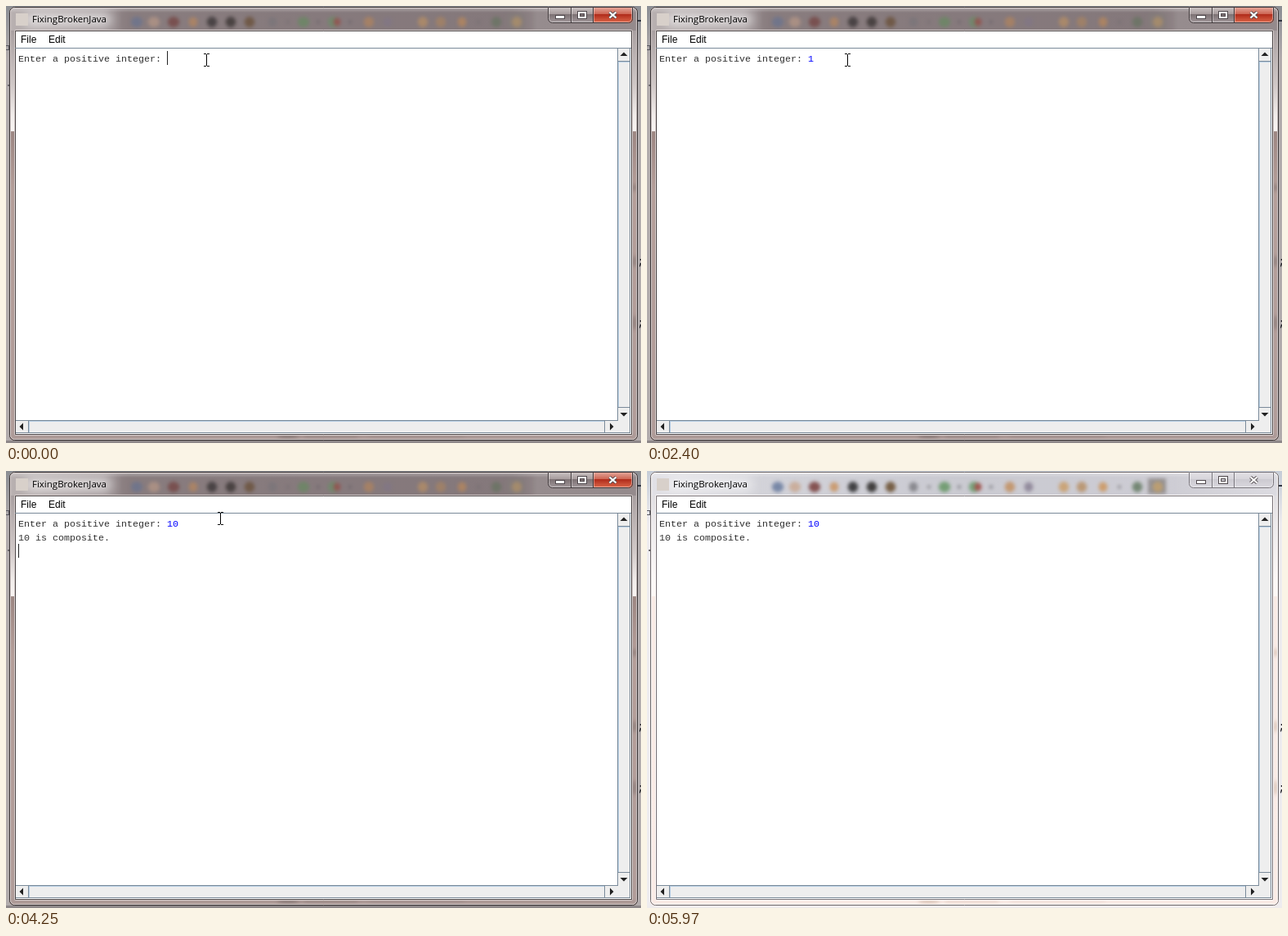
Recreate the animation shown at these times as an HTML page with a canvas. Size 777 px wide and 534 px high, loop 6.03 s.

```html
<!DOCTYPE html>
<html lang="en">
<head>
<meta charset="utf-8">
<title>FixingBrokenJava</title>
<style>
html, body { margin: 0; width: 100%; height: 100%; overflow: hidden; background: #b5b0b1; }
canvas { display: block; width: 777px; height: 534px; }
</style>
</head>
<body>
<canvas id="stage" width="777" height="534"></canvas>
<script>
const W = 777, H = 534, LOOP = 6030;
const ctx = document.getElementById('stage').getContext('2d');
const LINE = '#7a8a99', PANEL = '#eeeeee';

// Blurred toolbar icons seen through the glass: [x, colour, radius]
const ICONS = [
  [160, '#5f7399', 8], [181, '#c8a48c', 8], [205, '#6e2e2a', 8], [229, '#c98d55', 6],
  [252, '#171717', 7], [275, '#171512', 7], [298, '#5e401c', 7], [326, '#76767a', 6],
  [345, '#66666a', 2], [364, '#5c9159', 8], [382, '#58585c', 2], [400, '#619661', 7],
  [405, '#a03b36', 5], [421, '#58585c', 2], [444, '#c18a55', 7], [467, '#81788c', 6],
  [510, '#c9995e', 7], [532, '#b58a5a', 7], [558, '#cc8f50', 6], [578, '#66666a', 2],
  [600, '#5b7358', 7], [625, '#bf9b61', 7]
];

const ACTIVE = {
  edge: ['#8b8e94', '#b2acad'], outline: '#383233', rim: '#d9d0cf',
  title: [[0, '#b9b1b1'], [0.15, '#9f9597'], [0.19, '#8b8082'], [0.8, '#857a7d'],
          [0.84, '#968c8e'], [1, '#948a8c']],
  side: [[0, '#91878a'], [0.06, '#a9a0a1'], [0.18, '#cfc7c6'], [0.25, '#f1ecea'], [0.286, '#f8f4f2'],
         [0.288, '#9b8581'], [0.42, '#b39d98'], [1, '#af9b98']],
  bottom: '#ad9a97', smudge: '#746866', iconAlpha: 0.8, tint: '#85777955', glow: 0.72,
  button: ['#c9c1c1', '#a59a9b', '#7d7274', '#a1979a'],
  close: ['#e3a497', '#cc6250', '#b02c1b', '#dc6548'], buttonLine: '#40383a'
};
const IDLE = {
  edge: ['#c5ccd7', '#eeecef'], outline: '#6c6668', rim: '#fdfaf9',
  title: [[0, '#e2e1e6'], [0.17, '#d3d3d9'], [0.5, '#c9c9d0'], [0.82, '#cdccd3'], [1, '#dcdbe1']],
  side: [[0, '#d6d5da'], [0.12, '#ece9eb'], [0.25, '#fcf8f7'], [0.286, '#fdf8f6'],
         [0.288, '#f8eae5'], [1, '#f9ebe6']],
  bottom: '#f9eae5', smudge: '#c4a998', iconAlpha: 0.85, tint: '#d0d0d818', glow: 0.6,
  button: ['#e2e0e5', '#d6d4da', '#cccad1', '#dad8de'],
  close: ['#e2e0e5', '#d6d4da', '#cccad1', '#dad8de'], buttonLine: '#77747b'
};

function rect(c, x, y, w, h, fill) {
  c.fillStyle = fill;
  c.fillRect(x, y, w, h);
}

function text(c, str, x, y, font, fill) {
  c.font = font;
  c.fillStyle = fill;
  c.fillText(str, x, y);
}

function gradient(c, x0, y0, x1, y1, stops) {
  const g = c.createLinearGradient(x0, y0, x1, y1);
  stops.forEach(([at, colour]) => g.addColorStop(at, colour));
  return g;
}

function blob(c, x, y, rx, ry, fill) {
  c.fillStyle = fill;
  c.beginPath();
  c.ellipse(x, y, rx, ry, 0, 0, Math.PI * 2);
  c.fill();
}

function outline(c, x, y, w, h, radius, colour) {
  c.strokeStyle = colour;
  c.lineWidth = 1;
  c.beginPath();
  c.roundRect(x + 0.5, y + 0.5, w - 1, h - 1, radius);
  c.stroke();
}

function drawSurround(c, s) {
  rect(c, 0, 0, W, H, gradient(c, 0, 0, 0, H, [[0, s.edge[0]], [0.12, s.edge[1]], [1, s.edge[1]]]));
  rect(c, 0, 531, W, 3, s === ACTIVE ? '#8d8789' : '#eeebec');
  rect(c, 0, 48, 4, 1, '#55555c');
  rect(c, 3, 48, 1, 6, '#55555c');
  rect(c, 0, 53, 4, 1, '#55555c');
  rect(c, 2, 96, 2, 2, '#6a686c');
  [316, 391].forEach(y => text(c, ';', 773, y, 'bold 12px "Liberation Mono", monospace', '#1c1c22'));
  rect(c, 773, 17, 4, 2, '#303540');
}

function drawGlass(c, s) {
  c.save();
  c.beginPath();
  c.roundRect(4, 1, 769, 530, 6);
  c.clip();
  rect(c, 4, 1, 769, 530, gradient(c, 0, 1, 0, 531, s.side));
  rect(c, 4, 1, 769, 29, gradient(c, 4, 0, 773, 0, s.title));
  rect(c, 4, 522, 769, 9, s.bottom);

  c.filter = 'blur(2px)';
  c.globalAlpha = s.iconAlpha;
  rect(c, 613, 9, 22, 19, '#85817e');
  ICONS.forEach(([x, colour, r]) => blob(c, x, 19.5, r * 0.9, Math.min(r, 6.5), colour));
  c.globalAlpha = 1;
  rect(c, 140, 6, 505, 25, s.tint);

  c.globalAlpha = 0.5;
  blob(c, 345, 526, 13, 3, s.smudge);
  rect(c, 365, 525, 65, 2, s.smudge);
  rect(c, 445, 525, 115, 1, s.smudge);
  blob(c, 769, 222, 3, 5, s.smudge);
  blob(c, 769, 312, 3, 7, s.smudge);
  blob(c, 769, 387, 3, 9, s.smudge);

  c.filter = 'blur(7px)';
  c.globalAlpha = s.glow;
  rect(c, 24, 9, 104, 15, '#ffffff');
  c.restore();

  rect(c, 6, 2, 765, 6, gradient(c, 0, 2, 0, 8, [[0, '#ffffff55'], [1, '#ffffff00']]));
  outline(c, 4, 1, 769, 530, 6, s.outline);
  outline(c, 5, 2, 767, 528, 5, s.rim);
  outline(c, 10, 29, 757, 496, 1, s.rim);
  outline(c, 11, 30, 755, 494, 0, s === ACTIVE ? '#4b4546' : '#777176');
}

function drawCaptionButtons(c, s) {
  const shade = ([a, b, d, e]) => gradient(c, 0, 2, 0, 20, [[0, a], [0.45, b], [0.47, d], [1, e]]);
  c.save();
  c.beginPath();
  c.roundRect(663, 1, 104, 20, [0, 0, 5, 5]);
  c.clip();
  rect(c, 663, 1, 56, 20, shade(s.button));
  rect(c, 719, 1, 48, 20, shade(s.close));
  c.restore();
  outline(c, 664, 1, 102, 19, [0, 0, 4, 4], '#ffffff70');
  outline(c, 663, 1, 104, 20, [0, 0, 5, 5], s.buttonLine);
  [691, 718].forEach(x => {
    rect(c, x, 2, 1, 18, s.buttonLine);
    rect(c, x + 1, 2, 1, 17, '#ffffff60');
  });

  const dark = '#50494d';
  rect(c, 672, 11, 12, 5, dark);
  rect(c, 673, 12, 10, 3, '#ffffff');

  rect(c, 699, 6, 12, 10, dark);
  rect(c, 700, 7, 10, 8, '#ffffff');
  rect(c, 702, 9, 6, 4, dark);
  rect(c, 703, 10, 4, 2, s.button[2]);

  [[dark, 4], ['#ffffff', 2.3]].forEach(([colour, width]) => {
    c.strokeStyle = colour;
    c.lineWidth = width;
    c.beginPath();
    c.moveTo(738.5, 7.5); c.lineTo(746.5, 14.5);
    c.moveTo(746.5, 7.5); c.lineTo(738.5, 14.5);
    c.stroke();
  });
}

function arrow(c, x, y, angle) {
  c.save();
  c.translate(x, y);
  c.rotate(angle);
  c.fillStyle = '#222222';
  c.beginPath();
  c.moveTo(0, -2.5);
  c.lineTo(4.5, 2);
  c.lineTo(-4.5, 2);
  c.fill();
  c.restore();
}

function drawClient(c) {
  rect(c, 12, 31, 753, 492, '#ffffff');
  text(c, 'File', 18, 45, '12px "Liberation Sans", Arial, sans-serif', '#000000');
  text(c, 'Edit', 52, 45, '12px "Liberation Sans", Arial, sans-serif', '#000000');
  rect(c, 11, 51, 754, 1, LINE);

  rect(c, 748, 52, 16, 454, PANEL);
  rect(c, 12, 506, 752, 16, PANEL);
  rect(c, 748, 52, 1, 455, LINE);
  rect(c, 12, 506, 737, 1, LINE);
  rect(c, 763, 52, 1, 470, LINE);
  rect(c, 12, 521, 752, 1, LINE);
  [67, 490].forEach(y => rect(c, 749, y, 15, 1, LINE));
  [27, 732].forEach(x => rect(c, x, 507, 1, 14, LINE));
  rect(c, 749, 68, 14, 1, '#b8cfe5');
  rect(c, 749, 68, 1, 422, '#b8cfe5');
  rect(c, 28, 507, 1, 14, '#b8cfe5');
  rect(c, 28, 507, 704, 1, '#b8cfe5');

  arrow(c, 756, 59, 0);
  arrow(c, 756, 499, Math.PI);
  arrow(c, 19, 514, -Math.PI / 2);
  arrow(c, 741, 514, Math.PI / 2);
}

function makeWindow(s) {
  const layer = document.createElement('canvas');
  layer.width = W;
  layer.height = H;
  const c = layer.getContext('2d');
  drawSurround(c, s);
  drawGlass(c, s);
  drawCaptionButtons(c, s);
  rect(c, 12, 9, 15, 15, '#d8d0ca');
  text(c, 'FixingBrokenJava', 32, 20, '11.5px "Open Sans", "Noto Sans", sans-serif', '#000000');
  drawClient(c);
  return layer;
}

const activeWindow = makeWindow(ACTIVE);
const idleWindow = makeWindow(IDLE);

const MONO = '11.667px "Liberation Mono", "Courier New", monospace';
const CHAR = 7, LEFT = 15, PROMPT = 'Enter a positive integer: ';
const inputX = LEFT + PROMPT.length * CHAR;

// Spans in which the text caret is lit
const CARET_ON = [[0, 300], [710, 1170], [1690, 2400], [2550, 2980],
                  [3420, 3850], [4250, 4830], [5400, 5830]];

function pointerAt(t) {
  if (t < 4250) return [245, 58];
  if (t < 4380) return [262, 50];
  if (t < 4520) return [435, 292];
  return null;
}

function drawPointer(x, y) {
  for (const end of [y, y + 15]) {
    rect(ctx, x - 3, end, 3, 1, '#000000');
    rect(ctx, x + 1, end, 3, 1, '#000000');
  }
  rect(ctx, x, y + 1, 1, 14, '#000000');
}

function draw(t) {
  ctx.drawImage(t < 5970 ? activeWindow : idleWindow, 0, 0);

  const typed = t < 1970 ? '' : t < 2550 ? '1' : '10';
  const done = t >= 3420;
  text(ctx, PROMPT, LEFT, 68, MONO, '#303030');
  text(ctx, typed, inputX, 68, MONO, '#0000ff');
  if (done) text(ctx, '10 is composite.', LEFT, 85, MONO, '#303030');

  if (CARET_ON.some(([from, to]) => t >= from && t < to)) {
    const x = done ? LEFT : inputX + typed.length * CHAR;
    rect(ctx, x, done ? 89 : 55, 1, 17, '#222222');
  }

  const pointer = pointerAt(t);
  if (pointer) drawPointer(...pointer);
}

const start = performance.now();
function tick() {
  draw((performance.now() - start) % LOOP);
  requestAnimationFrame(tick);
}
tick();
</script>
</body>
</html>
```
